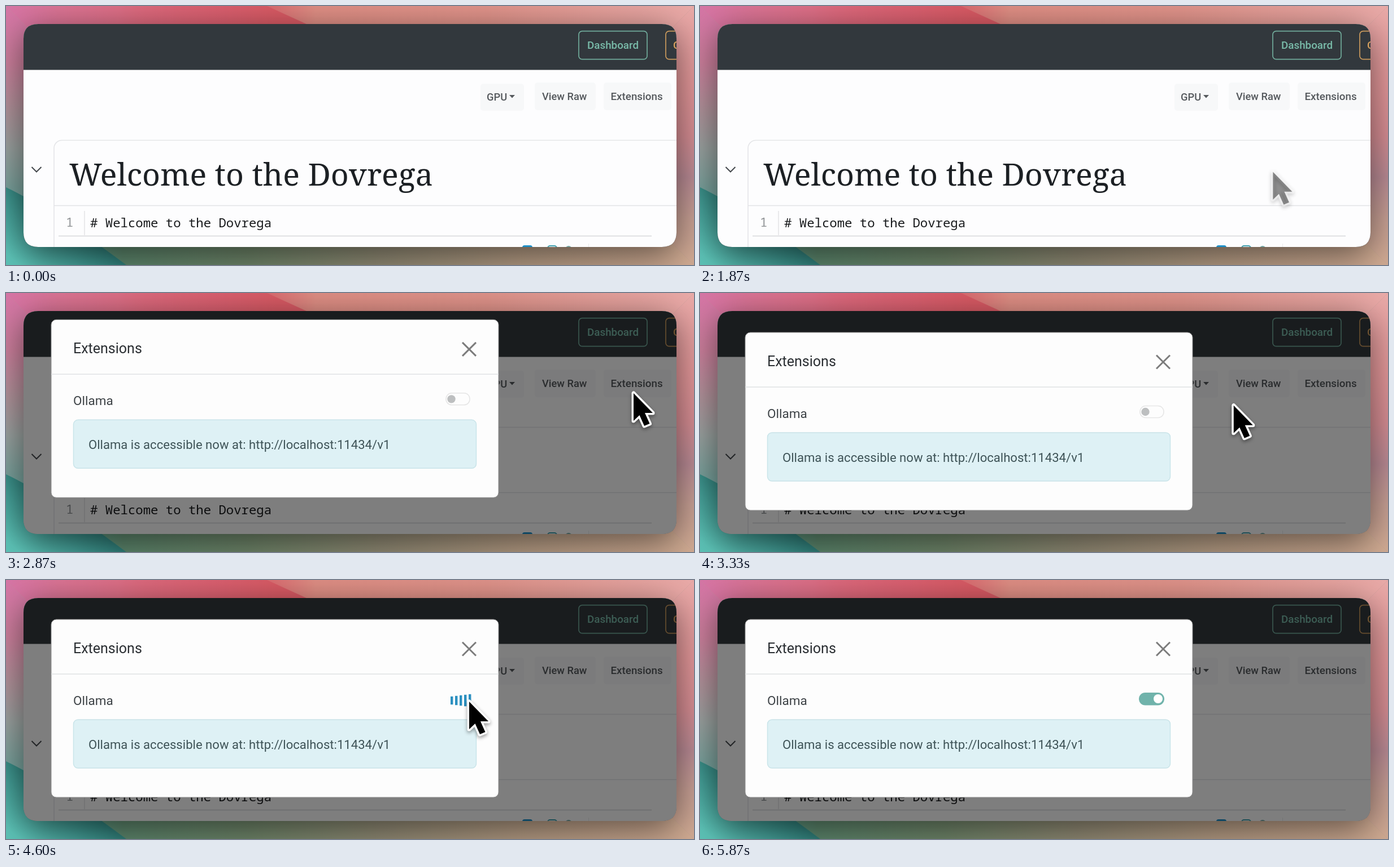
An HTML page with a canvas for the animation above (5.94 s loop, 1218x460 px).

```html
<!DOCTYPE html>
<html lang="en">
<head>
<meta charset="utf-8">
<title>Extensions demo</title>
<style>
html, body { margin: 0; width: 100%; height: 100%; overflow: hidden; }
canvas { display: block; }
</style>
</head>
<body>
<canvas id="stage" width="1218" height="460"></canvas>
<script>
const W = 1218, H = 460, LOOP = 5940, STEP = 200 / 3;
const SANS = 'Roboto, "Open Sans", sans-serif';
const MONO = '"Noto Sans Mono", "DejaVu Sans Mono", monospace';
const SERIF = '"Noto Serif", "Liberation Serif", serif';
const HEADING = 'Welcome to the Dovrega';
const stage = document.getElementById('stage').getContext('2d');
let ctx = stage;

const clamp = v => Math.max(0, Math.min(1, v));
const ramp = (t, a, b) => clamp((t - a) / (b - a));
const smooth = u => u * u * (3 - 2 * u);
const mix = (a, b, u) => a + (b - a) * u;

function text(str, x, y, size, color, family = SANS, weight = 400) {
  ctx.font = `${weight} ${size}px ${family}`;
  ctx.fillStyle = color;
  ctx.fillText(str, x, y);
}

function box(x, y, w, h, r, fill, stroke, lw = 1.5) {
  ctx.beginPath();
  ctx.roundRect(x, y, w, h, r);
  if (fill) { ctx.fillStyle = fill; ctx.fill(); }
  if (stroke) { ctx.strokeStyle = stroke; ctx.lineWidth = lw; ctx.stroke(); }
}

function line(points, color, lw = 1.5) {
  ctx.beginPath();
  points.forEach(([x, y]) => ctx.lineTo(x, y));
  ctx.strokeStyle = color;
  ctx.lineWidth = lw;
  ctx.stroke();
}

function dot(x, y, r, color) {
  ctx.beginPath();
  ctx.arc(x, y, r, 0, 7);
  ctx.fillStyle = color;
  ctx.fill();
}

function gradient(x0, y0, x1, y1, stops) {
  const g = ctx.createLinearGradient(x0, y0, x1, y1);
  stops.forEach(([at, color]) => g.addColorStop(at, color));
  return g;
}

function poly(points, fill) {
  ctx.beginPath();
  points.forEach(([x, y]) => ctx.lineTo(x, y));
  ctx.closePath();
  ctx.fillStyle = fill;
  ctx.fill();
}

// Window outline with softly squared corners
function windowPath() {
  const l = 31, t = 32, r = 1187, b = 428, c = 26;
  ctx.beginPath();
  ctx.moveTo(l + c, t);
  ctx.lineTo(r - c, t);
  ctx.quadraticCurveTo(r, t, r, t + c);
  ctx.lineTo(r, b - c);
  ctx.quadraticCurveTo(r, b, r - c, b);
  ctx.lineTo(l + c, b);
  ctx.quadraticCurveTo(l, b, l, b - c);
  ctx.lineTo(l, t + c);
  ctx.quadraticCurveTo(l, t, l + c, t);
}

function makeWallpaper() {
  const c = document.createElement('canvas');
  c.width = W;
  c.height = H;
  ctx = c.getContext('2d');
  ctx.fillStyle = '#b59a90';
  ctx.fillRect(0, 0, W, H);
  poly([[0, 0], [60, 60], [60, 400], [0, H]], gradient(0, 0, 0, H,
    [[0, '#d675a6'], [.22, '#cc7f9c'], [.4, '#b0929a'], [.55, '#98a09e'], [.7, '#7aa09b'], [1, '#58bdb2']]));
  poly([[W, 0], [W - 60, 60], [W - 60, 400], [W, H]], gradient(0, 0, 0, H,
    [[0, '#eaaaa8'], [.3, '#e29698'], [.5, '#d58c92'], [.66, '#b98a94'], [.82, '#c8a094'], [1, '#d0aa92']]));
  poly([[0, H], [60, 400], [W - 60, 400], [W, H]], gradient(0, 0, W, 0,
    [[0, '#58bdb2'], [.17, '#5b856b'], [.35, '#6d8468'], [.55, '#918a74'], [.75, '#b39a82'], [1, '#d0aa92']]));
  poly([[0, 0], [60, 60], [W - 60, 60], [W, 0]], gradient(0, 0, W, 0,
    [[0, '#d675a6'], [.08, '#dc7494'], [.2, '#de6c80'], [.38, '#dc6a70'], [.45, '#df8e84'], [.7, '#e0938a'], [1, '#eaaaa8']]));
  poly([[200, 0], [462, 0], [545, 38], [200, 38]], gradient(200, 0, 480, 0,
    [[0, 'rgba(219,96,118,0)'], [.6, '#db6070'], [1, '#d95a64']]));

  ctx.beginPath();
  ctx.moveTo(0, 322);
  ctx.quadraticCurveTo(80, 360, 213, H);
  ctx.lineTo(0, H);
  ctx.fillStyle = gradient(100, 372, 28, 462, [[0, '#2f7d78'], [.45, '#449f97'], [1, '#5cc2b6']]);
  ctx.fill();

  ctx.shadowColor = 'rgba(0,0,0,.52)';
  ctx.shadowBlur = 60;
  ctx.shadowOffsetY = 13;
  windowPath();
  ctx.fillStyle = '#000';
  ctx.fill();
  ctx = stage;
  return c;
}

function drawPage(pressed) {
  ctx.fillStyle = '#fdfdfe';
  ctx.fillRect(31, 32, 1156, 396);
  ctx.fillStyle = '#32383d';
  ctx.fillRect(31, 32, 1156, 81.5);

  box(1014, 44.7, 121, 50, 6, null, '#70ab9b', 1.7);
  text('Dashboard', 1029, 76, 18.8, '#79bba9', SANS, 500);
  box(1168, 44.7, 121, 50, 6, null, '#cb9a5c', 1.7);
  text('C', 1181, 76, 18.8, '#d6a05e', SANS, 500);

  box(840, 138, 77, 48, 5, '#f7f8f9');
  box(936, 136, 108, 49, 5, '#f7f8f9');
  if (pressed) box(1057, 135.5, 121, 49.5, 5, '#cdcdcd', '#bcbcbc', 1);
  else box(1058, 136, 120, 49, 5, '#f7f8f9');
  text('GPU', 851, 168, 18.3, '#55595d', SANS, 500);
  poly([[891, 158], [901, 158], [896, 163.5]], '#55595d');
  text('View Raw', 949, 166.5, 18.3, '#55595d', SANS, 500);
  text('Extensions', 1070.5, 166.5, 18.8, '#55595d', SANS, 500);

  box(85, 238.5, 1200, 300, 14, null, '#e4e5e7');
  line([[85, 354.5], [1187, 354.5]], '#e2e3e5');
  line([[45.5, 286], [54, 294.5], [62.5, 286]], '#43474b', 2);
  text(HEADING, 112, 319, 55.5, '#1c2024', SERIF);

  text('1', 106, 392, 22.3, '#909396', MONO);
  line([[139, 364], [139, 407]], '#dcdddf', 1.2);
  text('# ' + HEADING, 149, 393, 22.3, '#17191b', MONO);
  line([[93, 408.5], [1143, 408.5]], '#d6d8da');

  box(914, 425, 18, 12, 4, '#1c8fc8');
  box(959, 426, 16, 14, 4, null, '#3b9dac', 2);
  box(991, 427, 10, 10, 5, null, '#71a6a4', 2);
  line([[1031.5, 422], [1031.5, 428]], '#e8e9ea', 1);
}

function drawToggle(on) {
  if (on) {
    box(777, 200, 45, 22.5, 11.2, '#70b3ab');
    dot(811, 211, 8, '#fff');
  } else {
    box(779, 200.5, 42, 21, 10, '#fdfdfd', '#e6e6e6');
    dot(788.5, 211, 7.2, '#bdbfc0');
  }
}

// Five bars that each snap tall, then shrink, one after the other
function drawLoader(t) {
  for (let i = 0; i < 5; i++) {
    const p = (t - 3920) / 1000 - i * .1;
    const h = 28 - 20 * (p - Math.floor(p));
    ctx.fillStyle = '#2b90c0';
    ctx.fillRect(787 + i * 8, 214 - h / 2, 4.4, h);
  }
}

function drawModal(t) {
  const shade = ramp(t, 2640, 2790);
  if (!shade) return;
  ctx.fillStyle = `rgba(0,0,0,${shade * .5})`;
  ctx.fillRect(31, 32, 1156, 396);

  ctx.save();
  ctx.globalAlpha = ramp(t, 2695, 2845);
  ctx.translate(0, -90 * Math.pow(1 - ramp(t, 2700, 3000), 1.7));
  box(80, 70, 792, 316, 9, '#fdfdfd', '#8d8d8d', 1);
  text('Extensions', 119, 130, 25, '#2b2f33');
  line([[808, 110.5], [832, 134.5]], '#7c7c7c', 3);
  line([[832, 110.5], [808, 134.5]], '#7c7c7c', 3);
  line([[80, 167], [872, 167]], '#e1e3e5');
  text('Ollama', 119, 222, 22.5, '#3d4246');
  box(119.5, 248, 713, 86, 8, '#def1f5', '#c9e4e9');
  text('Ollama is accessible now at: http://localhost:11434/v1', 146, 300, 22.1, '#3e5357');
  if (t > 3850 && t < 5060) drawLoader(t);
  else drawToggle(t > 5060);
  ctx.restore();
}

function drawCursor(t) {
  const alpha = ramp(t, 1800, 1950) * (1 - ramp(t, 4650, 4850));
  if (!alpha) return;
  const enter = smooth(ramp(t, 1800, 2330));
  const move = smooth(ramp(t, 2950, 3650));
  const x = mix(mix(1010, 1111, enter), 820, move);
  const y = mix(mix(300, 178, enter), 216, move);
  const dip = (a, b) => ramp(t, a, a + 100) * (1 - ramp(t, b, b + 200));
  const scale = 1 - .2 * (dip(2330, 2500) + dip(3680, 3800));

  ctx.save();
  ctx.globalAlpha = alpha;
  ctx.translate(x, y);
  ctx.scale(scale, scale);
  ctx.beginPath();
  [[0, 0], [0, 49], [10.5, 39], [19, 58], [28.5, 54], [20, 35], [34, 35]]
    .forEach(([px, py]) => ctx.lineTo(px, py));
  ctx.closePath();
  ctx.strokeStyle = '#fff';
  ctx.lineWidth = 7;
  ctx.lineJoin = 'round';
  ctx.shadowColor = 'rgba(0,0,0,.4)';
  ctx.shadowBlur = 6;
  ctx.shadowOffsetY = 3;
  ctx.stroke();
  ctx.shadowColor = 'transparent';
  ctx.fillStyle = '#000';
  ctx.fill();
  ctx.restore();
}

const wallpaper = makeWallpaper();

function draw(t) {
  ctx.drawImage(wallpaper, 0, 0);
  if (t > 5060 && t < 5330) return;
  ctx.save();
  windowPath();
  ctx.clip();
  drawPage(t > 2260 && t < 2640);
  drawModal(t);
  drawCursor(t);
  ctx.restore();
}

const start = performance.now();
function tick() {
  const t = (performance.now() - start) % LOOP;
  draw(Math.min(88, Math.floor(t / STEP + .1)) * STEP);
  requestAnimationFrame(tick);
}
tick();
</script>
</body>
</html>
```
